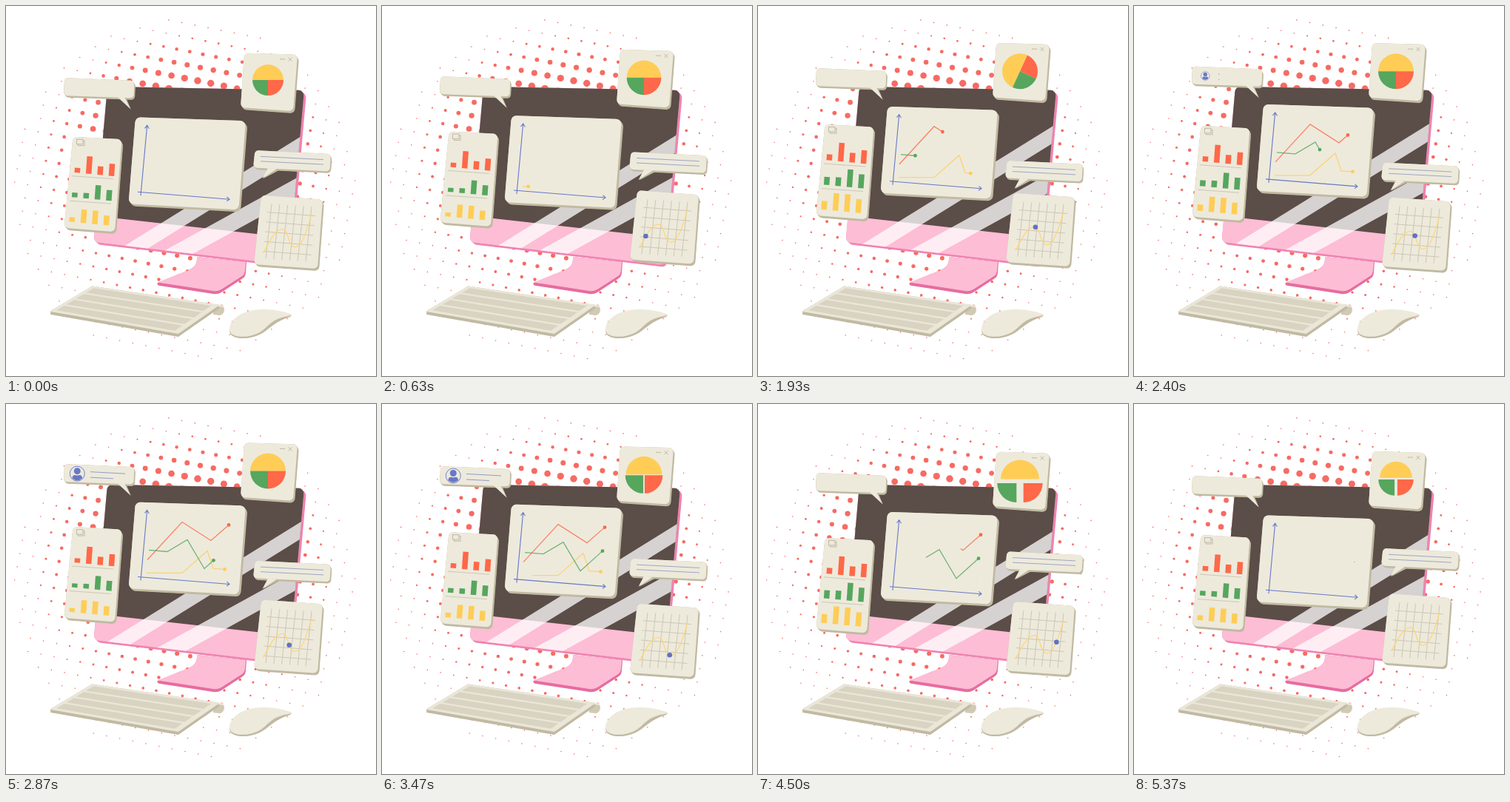
These frames come from a looping animation (500x500 px, 5410 ms). An HTML page with a canvas:

```html
<!DOCTYPE html>
<html lang="en">
<head>
<meta charset="utf-8">
<title>Desktop analytics</title>
<style>
html, body { margin: 0; width: 100%; height: 100%; overflow: hidden; background: #fff; }
canvas { display: block; width: 100vw; height: 100vh; }
</style>
</head>
<body>
<canvas id="stage"></canvas>
<script>
const LOOP = 5410, TAU = Math.PI * 2;
const RED = '#ff6848', GREEN = '#56a65e', YELLOW = '#ffcd56', BLUE = '#6878c6';
const PAPER = '#edeadc', SIDE = '#c1baa2', LINE = '#cdc7b4', ICON = '#bfb9a5';
const PINK = '#fdbdd5';

const canvas = document.getElementById('stage');
const ctx = canvas.getContext('2d');
const ratio = window.devicePixelRatio || 1;
canvas.width = canvas.height = 500 * ratio;

const clamp = v => Math.max(0, Math.min(1, v));
const mix = (a, b, f) => a.map((v, k) => v + (b[k] - v) * f);
const smooth = (t, a, b) => { const u = clamp((t - a) / (b - a)); return u * u * (3 - 2 * u); };
const cubic = u => u < .5 ? 4 * u ** 3 : 1 - 4 * (1 - u) ** 3;
const bob = (t, mid, amp, peak = 0) => mid + amp * Math.cos(TAU * (t - peak) / LOOP);

function shape(pts, r = 0) {
  const n = pts.length;
  ctx.beginPath();
  ctx.moveTo(...mix(pts[0], pts[n - 1], .5));
  pts.forEach((p, i) => ctx.arcTo(...p, ...pts[(i + 1) % n], r));
  ctx.closePath();
}

function fill(pts, color, r) {
  shape(pts, r);
  ctx.fillStyle = color;
  ctx.fill();
}

function slab(pts, r, dx, dy, face = PAPER, side = SIDE) {
  for (let k = 1; k > 0; k -= .2) fill(pts.map(([x, y]) => [x + dx * k, y + dy * k]), side, r);
  fill(pts, face, r);
}

function disc(x, y, r, color) {
  ctx.beginPath();
  ctx.arc(x, y, r, 0, TAU);
  ctx.fillStyle = color;
  ctx.fill();
}

function stroke(pts, color, width = 1) {
  ctx.beginPath();
  pts.forEach(p => ctx.lineTo(...p));
  ctx.strokeStyle = color;
  ctx.lineWidth = width;
  ctx.stroke();
}

function fillPath(d, color) {
  ctx.fillStyle = color;
  ctx.fill(new Path2D(d));
}

function at(y, draw) {
  ctx.save();
  ctx.translate(0, y);
  draw();
  ctx.restore();
}

// a turned square grid, dots shrinking outward and downward
function halftone() {
  for (let i = -18; i <= 18; i++) for (let j = -25; j <= 10; j++) {
    const x = 259 + 17.7 * i + 3.5 * j, y = 101 + 3.5 * i - 17.9 * j;
    const d = Math.hypot(x - 241, y - 249);
    if (d > 232 || d < 70) continue;
    const fade = 1 - .64 * clamp((y - 100) / 220);
    disc(x, y, Math.max(.8, Math.min(5.2, .061 * (227 - d) * fade)), '#f66b63');
  }
}

function band(left, width, slope) {
  const p = (x, dx) => [x + dx, 323 - slope * dx];
  const right = left + width;
  fill([p(left, -60), p(left, 300), p(right, 300), p(right, -60)], 'rgba(255,255,255,.75)');
}

function monitor(t) {
  fillPath('M258 339C259 352 252 356 234 362L205 374Q203 377 208 378L280 389Q286 390 291 387L320 368Q324 365 324 360L325 346Z', '#e66c9f');
  fillPath('M258 339C259 352 252 356 234 362L205 373.5L280 385Q286 386 291 383L319 365Q323 362 323 357L324 346Z', PINK);
  const front = [[137, 109], [403, 114], [382, 350], [118.5, 319]];
  slab(front, 7, 3, 3, PINK, '#f083b0');
  ctx.save();
  shape(front, 7);
  ctx.clip();
  fill([[110, 100], [410, 100], [410, 316], [110, 282.5]], '#5b4d47');
  band(bob(t, 148, 14), 37, .62);
  band(bob(t, 222, 6), 46, .55);
  ctx.restore();
}

const lengths = pts => pts.slice(1).map((p, i) => Math.hypot(p[0] - pts[i][0], p[1] - pts[i][1]));

function pointOn(pts, left) {
  const segs = lengths(pts);
  let i = 0;
  while (i < segs.length - 1 && left > segs[i]) left -= segs[i++];
  return mix(pts[i], pts[i + 1], clamp(left / segs[i]));
}

const series = [
  [YELLOW, [[190, 96], [238, 96], [272, 66], [280, 90], [295.5, 91]]],
  [RED, [[191, 78], [238, 27], [277, 52], [301, 31]]],
  [GREEN, [[193, 65], [218, 67], [245, 51], [268, 90], [298, 63]]]
];

function plot(t, color, pts, i) {
  const from = 360 + 570 * i, gone = 4460 + 435 * i;
  if (t < from) return;
  const total = lengths(pts).reduce((a, b) => a + b);
  const head = total * smooth(t, from, from + 1850);
  const tail = total * smooth(t, gone - 1230, gone);
  if (head > tail) {
    ctx.setLineDash([head - tail, total * 2]);
    ctx.lineDashOffset = -tail;
    ctx.globalAlpha = .8;
    stroke(pts, color, 1.3);
    ctx.globalAlpha = 1;
    ctx.setLineDash([]);
  }
  const size = smooth(t, from, from + 150) - smooth(t, gone, gone + 60);
  disc(...pointOn(pts, head), 2.4 * size, color);
}

function chart(t) {
  slab([[175, 0], [324, 5], [314.5, 125], [165.5, 117]], 7, 2.5, 3);
  stroke([[182, 106], [190.7, 11]], BLUE, 1.1);
  stroke([[187.5, 15], [190.7, 11], [193.4, 15.5]], BLUE, 1.1);
  stroke([[178, 101], [302, 111]], BLUE, 1.1);
  stroke([[298.5, 107.7], [302, 111], [298, 113.6]], BLUE, 1.1);
  series.forEach(([color, pts], i) => plot(t, color, pts, i));
}

function slice(x, y, r, from, to, color) {
  ctx.beginPath();
  ctx.moveTo(x, y);
  ctx.arc(x, y, r, from, to);
  ctx.fillStyle = color;
  ctx.fill();
}

function pie(t) {
  slab([[322, -1], [394, 1], [388, 77.5], [317, 72.5]], 6, 2, 3);
  stroke([[370, 7], [377, 7.3]], ICON);
  stroke([[381.5, 5], [386.5, 10]], ICON);
  stroke([[386.5, 5], [381.5, 10]], ICON);
  const apart = smooth(t, 3300, 3900);
  const gap = 4.7 * (apart - smooth(t, 4700, 5900));
  const r = 21 + 3 * smooth(t, 0, 900) + 2 * apart - 5 * smooth(t, 4700, 5600);
  ctx.save();
  ctx.translate(354, 21.7 + .65 * r);
  ctx.rotate(TAU * cubic(clamp((t - 1230) / 1090)));
  slice(0, -gap * .6, r, Math.PI, TAU, YELLOW);
  slice(gap, gap * .6, r, 0, TAU / 4, RED);
  slice(-gap, gap * .6, r, TAU / 4, Math.PI, GREEN);
  ctx.restore();
}

// colour, growth at the pulse, resting heights
const rows = [
  [RED, 2, [6, 23, 11, 16]],
  [GREEN, 6, [5, 6, 18, 13]],
  [YELLOW, 7, [5, 17, 17, 12]]
];

function bars(t) {
  slab([[90.5, -1], [156.5, 2.5], [147, 127.5], [78.5, 122]], 6, 2, 3);
  ctx.fillStyle = PAPER;
  ctx.strokeStyle = ICON;
  ctx.lineWidth = 1;
  for (const k of [2, 0]) {
    ctx.fillRect(95.5 + k, 2.5 + k, 8.5, 6.5);
    ctx.strokeRect(95.5 + k, 2.5 + k, 8.5, 6.5);
  }
  for (const r of [0, 1]) stroke([[89 - 3 * r, 52 + 33.5 * r], [145 - 3 * r, 56 + 33.5 * r]], LINE);
  const pulse = .5 + .5 * Math.cos(TAU * 2 * (t - 1730) / LOOP);
  rows.forEach(([color, gain, rest], r) => rest.forEach((h, c) => {
    const size = h + gain * pulse, lean = size * .07;
    const x = 92.5 - 3.6 * r + 15.4 * c, y = 47.2 + 33.3 * r + 1.5 * c;
    fill([[x + lean, y - size], [x + 7.5 + lean, y + .5 - size], [x + 7.5, y + .6], [x, y]], color);
  }));
}

function profile(t) {
  fill([[150, 23], [161, 24], [169, 43]], SIDE);
  slab([[79, 0], [173.5, 4], [172.5, 27.5], [78, 24]], 5, 1.5, 2.5);
  fill([[148.5, 24], [159, 24], [168, 42]], PAPER);
  const size = smooth(t, 2150, 2600) - smooth(t, 4100, 4530);
  ctx.save();
  ctx.translate(96.3, 13);
  ctx.scale(size, size);
  ctx.beginPath();
  ctx.arc(0, 0, 10, 0, TAU);
  ctx.strokeStyle = BLUE;
  ctx.lineWidth = .9;
  ctx.stroke();
  disc(0, -3.5, 4.5, BLUE);
  fillPath('M-7 6C-6 1 -3 1.5 0 2.5C3 1.5 6 1 7 6Q0 12 -7 6Z', BLUE);
  ctx.restore();
  const reach = smooth(t, 2350, 2800) - smooth(t, 3970, 4380);
  if (reach <= 0) return;
  stroke([[114, 10.5], [114 + 47 * reach, 10.5 + 2.5 * reach]], '#929bca');
  stroke([[114, 18], [114 + 31 * reach, 18 + 1.6 * reach]], '#929bca');
}

function note() {
  fill([[356, 26], [369, 27], [348, 38]], SIDE);
  slab([[336.5, 0], [439, 5], [437.5, 28.5], [334, 23.5]], 5, 1.5, 2.5);
  fill([[354, 24], [366, 25], [346.5, 38]], PAPER);
  for (const y of [8.3, 14.8]) stroke([[344, y], [429, y + 4.3]], '#a0a5c3');
}

const wave = [
  [[348, 77], [356, 61], [364, 45], [373, 45]],
  [[373, 45], [383, 45], [380, 69], [391, 69]],
  [[391, 69], [400, 69], [408, 43], [413, 24]]
];

function waveAt(s) {
  const i = Math.min(2, Math.floor(s));
  let pts = wave[i];
  while (pts.length > 1) pts = pts.slice(1).map((p, k) => mix(pts[k], p, s - i));
  return pts[0];
}

function graph(t) {
  slab([[345, -1], [428, 5], [421, 98.5], [335, 92.5]], 6, 2, 3);
  for (let i = 0; i < 6; i++) {
    const x = 359 + 10.8 * i;
    stroke([[x, 11 + .7 * i], [x - 8, 85 + .7 * i]], LINE);
  }
  for (let j = 0; j < 5; j++) {
    const x = 353 - 1.4 * j, y = 22 + 13.2 * j;
    stroke([[x, y], [x + 65, y + 5]], LINE);
  }
  ctx.beginPath();
  ctx.moveTo(...wave[0][0]);
  wave.forEach(w => ctx.bezierCurveTo(...w.slice(1).flat()));
  ctx.strokeStyle = '#ffd678';
  ctx.lineWidth = 1.3;
  ctx.stroke();
  const size = smooth(t, 300, 520) - smooth(t, 5130, 5320);
  disc(...waveAt(3 * t / LOOP), 3.3 * size, '#6071c4');
}

function keyboard() {
  fillPath('M280 403L291 404.5C297 406 296 417 289 418L280 417Z', '#d0c9b4');
  const [a, b, c, d] = [[116.5, 378.5], [289, 404], [233, 443], [59, 412.8]];
  slab([a, b, c, d], .6, 0, 4, '#eae6d8', SIDE);
  const spot = (u, v) => mix(mix(a, b, u), mix(d, c, u), v);
  for (let i = 0; i < 4; i++) {
    const v = .06 + .23 * i, w = v + .18;
    fill([spot(.03, v), spot(.95, v), spot(.95, w), spot(.03, w)], '#d9d3c1');
  }
  stroke([[284, 404], [294, 406]], '#eae6d8', 2.5);
}

function mouse() {
  fillPath('M302 437C300 450 322 451 335 447C355 441 358 428 384 420Q387 418 384 416L350 412Z', SIDE);
  fillPath('M302 435C305 419 326 409 350 410C363 410 376 413 384 416C388 418 382 419 376 420C352 426 354 439 333 445C319 449 300 447 302 435Z', PAPER);
}

function render(t) {
  ctx.setTransform(ratio, 0, 0, ratio, 0, 0);
  ctx.fillStyle = '#fff';
  ctx.fillRect(0, 0, 500, 500);
  halftone();
  monitor(t);
  at(bob(t, 141.3, 9), () => chart(t));
  at(bob(t, 171.5, 10.5, 4600), () => bars(t));
  at(bob(t, 58.5, 7.8, 4850), () => pie(t));
  at(bob(t, 89, 8), () => profile(t));
  at(bob(t, 203.5, -8.5), note);
  at(bob(t, 260, 11.5, 3800), () => graph(t));
  keyboard();
  mouse();
}

const start = performance.now();
function tick() {
  render((performance.now() - start) % LOOP);
  requestAnimationFrame(tick);
}
tick();
</script>
</body>
</html>
```
